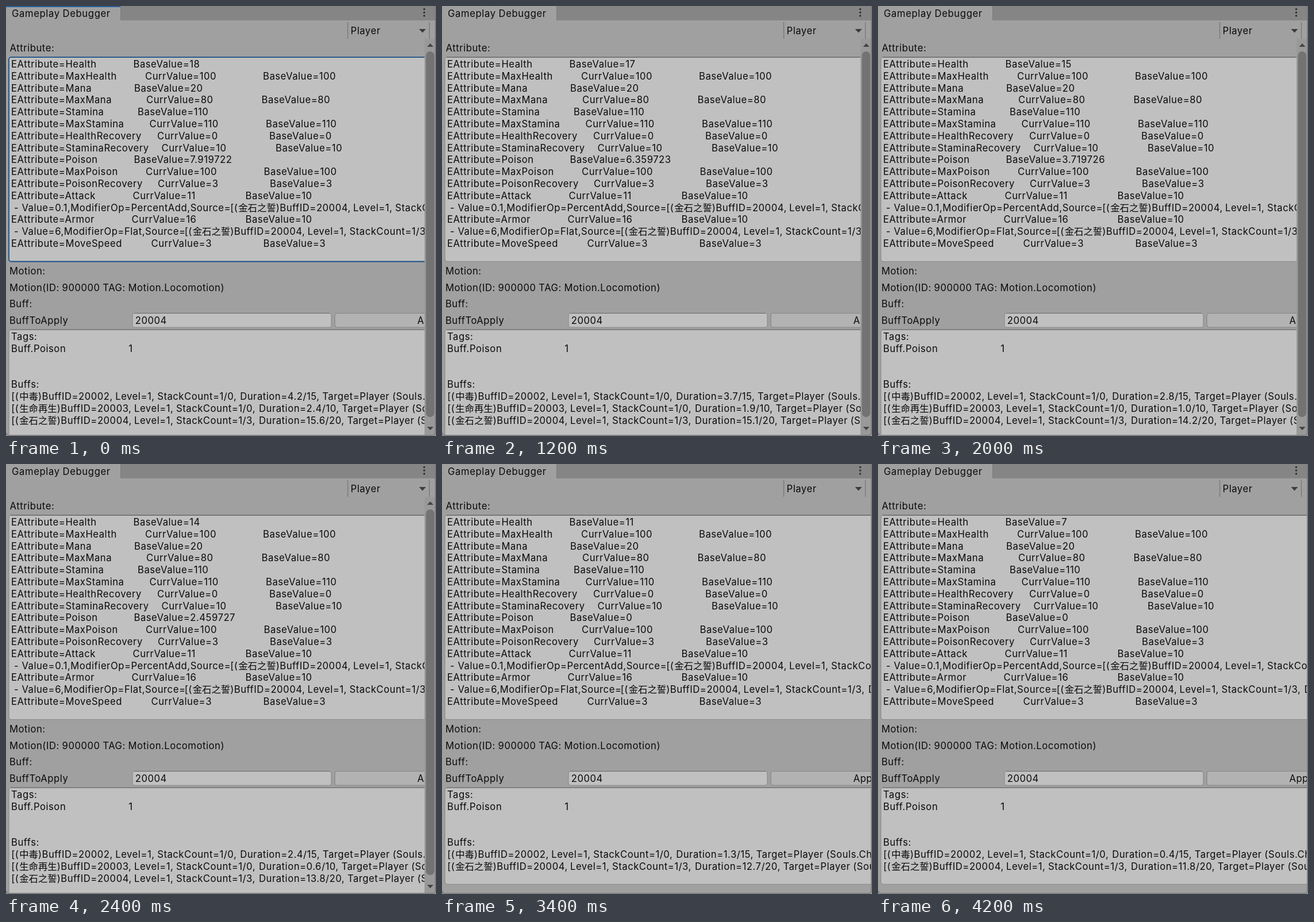
Animation, 748 px wide and 748 px high, one loop 4300 ms. Source, as an HTML page:

```html
<!DOCTYPE html>
<html lang="en">
<head>
<meta charset="utf-8">
<title>Gameplay Debugger</title>
<style>
  html, body { margin: 0; width: 100%; height: 100%; overflow: hidden; background: #a0a0a0; }
  svg { display: block; width: 748px; height: 748px; }
  text {
    font: 16.64px Inter, "Noto Sans CJK SC", "Noto Sans CJK", sans-serif;
    letter-spacing: .54px; word-spacing: -.5px; white-space: pre; fill: #0a0a0a;
  }
  .cjk { font: 500 16.4px "Noto Sans CJK SC", "Noto Sans CJK", sans-serif; letter-spacing: 0; }
  .title { letter-spacing: .64px; }
  .area { fill: #c0c0c0; stroke: #8b8b8b; stroke-width: 1.2; }
  .area.focus { stroke: #1d5087; stroke-width: 1.8; }
  .top { stroke: #666; stroke-width: 1.2; }
</style>
</head>
<body>
<svg viewBox="0 0 748 748">
  <defs><clipPath id="view"><rect id="viewBox" y="57" width="728" height="689"/></clipPath></defs>
  <rect width="748" height="748" fill="#a0a0a0"/>
  <rect x="199" width="549" height="25" fill="#858585"/>
  <path d="M199.5 0V25" stroke="#7c7c7c"/>
  <rect id="tabLine" width="199" height="2" fill="#2b6199"/>
  <g fill="#303030"><circle cx="727.5" cy="5.5" r="1.7"/><circle cx="727.5" cy="11.2" r="1.7"/><circle cx="727.5" cy="17" r="1.7"/></g>
  <path d="M594.5 28V57M736.5 28V57" stroke="#7a7a7a" stroke-width="1.4"/>
  <path d="M718.5 40H730.5L724.5 46.5Z" fill="#3c3c3c"/>
  <g id="header"></g>
  <g clip-path="url(#view)">
    <rect id="attrBox" class="area" x="5" y="89.2" width="760" height="355.3" rx="4"/>
    <path id="attrTop" class="top" d="M8 89.2H748"/>
    <rect class="area" x="220" y="534.5" width="346" height="24.5" rx="4"/>
    <path class="top" d="M223 534.5H563"/>
    <rect x="572" y="534.5" width="330" height="24.5" rx="4" fill="#b2b2b2" stroke="#868686" stroke-width="1.2"/>
    <rect id="buffBox" class="area" x="5" y="563" width="760" height="189" rx="4"/>
    <path class="top" d="M8 563H748"/>
    <g id="labels"></g>
    <g id="live"></g>
  </g>
  <g id="scroll">
    <rect x="728" y="57" width="19" height="689" fill="#999"/>
    <rect x="730.5" y="79" width="14.5" height="636" rx="7.2" fill="#737373"/>
    <path d="M732.5 71H743.5L738 65ZM732.5 732H743.5L738 738Z" fill="#454545"/>
  </g>
  <path d="M747 0V742Q747 747 742 747H5Q.5 747 .5 742" fill="none" stroke="#777" stroke-width="1.6"/>
</svg>
<script>
const $ = id => document.getElementById(id);
const ROW = 20.8, ATTR_Y = 107, BUFF_Y = 685;
const LOOP = 4300, HOLD = 800, STEP = 100;

const text = (x, y, s, cls = "") => `<text x="${x}" y="${y}" class="${cls}">${s}</text>`;
const cols = (y, ...parts) => parts.map(([x, s]) => text(x, y, s)).join("");

// "[(name)BuffID=..., Level=1, StackCount=..., rest"
function buff(x, y, name, id, stack, rest) {
  const end = x + 14.7 + 16.4 * name.length;
  const base = end - 80.3;
  return text(x + .2, y, "[(") + text(x + 14.2, y, name, "cjk") +
    text(end - .6, y, `)BuffID=${id},`) +
    cols(y, [base + 214, "Level=1,"], [base + 287, `StackCount=${stack},`], [base + 431, rest]);
}

const attrs = [
  ["Health"],
  ["MaxHealth", 242, 100, 447, 100],
  ["Mana", 0, 0, 223, 20],
  ["MaxMana", 244, 80, 444.5, 80],
  ["Stamina", 0, 0, 229, 110],
  ["MaxStamina", 249.5, 110, 452, 110],
  ["HealthRecovery", 263, 0, 458, 0],
  ["StaminaRecovery", 270.5, 10, 469, 10],
  ["Poison"],
  ["MaxPoison", 243, 100, 448.5, 100],
  ["PoisonRecovery", 264, 3, 459, 3],
  ["Attack", 220.5, 11, 416.5, 10],
  null,
  ["Armor", 218.5, 16, 416.5, 10],
  null,
  ["MoveSpeed", 252.5, 3, 447.5, 3]
];

$("header").innerHTML = text(10, 19, "Gameplay Debugger", "title") + text(599.5, 49, "Player") + text(6.6, 78.6, "Attribute:");

const oath = "金石之誓";
const modifier = (row, s, x) => {
  const y = ATTR_Y + row * ROW;
  return text(14, y, "-") + text(27.4, y, s) +
    buff(x, y, oath, 20004, "1/3", "Duration=15.6/20");
};

$("labels").innerHTML = attrs.map((a, i) => {
  if (!a) return "";
  const [name, cx, curr, bx, base] = a, y = ATTR_Y + i * ROW;
  return cols(y, [9, "EAttribute=" + name]) +
    (cx ? cols(y, [cx, "CurrValue=" + curr]) : "") +
    (bx ? cols(y, [bx, "BaseValue=" + base]) : "");
}).join("") +
  modifier(12, "Value=0.1,ModifierOp=PercentAdd,Source=", 390) +
  modifier(14, "Value=6,ModifierOp=Flat,Source=", 310.5) +
  cols(467, [5.9, "Motion:"]) +
  cols(495.6, [5.9, "Motion(ID: 900000 TAG: Motion.Locomotion)"]) +
  cols(524, [5.9, "Buff:"]) +
  cols(552.5, [5.9, "BuffToApply"], [224.8, "20004"], [715.4, "Apply"]) +
  cols(581, [9, "Tags:"]) +
  cols(601.8, [9, "Buff.Poison"], [213.2, "1"]) +
  cols(664.2, [9, "Buffs:"]);

// [step, physics ticks, health]
const keys = [[0, 0, 18], [1, 4, 18], [9, 48, 16], [17, 91, 14], [23, 125, 13], [31, 169, 9], [35, 191, 7]];

function sample(k, col) {
  const i = Math.max(1, keys.findIndex(r => r[0] >= k));
  const a = keys[i - 1], b = keys[i];
  return Math.round(a[col] + (b[col] - a[col]) * (k - a[0]) / (b[0] - a[0]));
}

function draw(k) {
  const ticks = sample(k, 1), time = ticks * .02;
  const poison = 7.919722 - ticks * (.06 - 5e-8);
  const buffs = [
    ["中毒", 20002, "1/0", 4.21, 15],
    ["生命再生", 20003, "1/0", 2.4, 10],
    [oath, 20004, "1/3", 15.6, 20]
  ].filter(b => b[3] > time);
  const scrolls = buffs.length > 2, focused = k === 0;

  $("live").innerHTML =
    cols(ATTR_Y, [221.5, "BaseValue=" + sample(k, 2)]) +
    cols(ATTR_Y + 8 * ROW, [222.5, "BaseValue=" + (poison > .001 ? +poison.toPrecision(7) : 0)]) +
    buffs.map(([name, id, stack, left, total], i) =>
      buff(9, BUFF_Y + i * ROW, name, id, stack,
        `Duration=${(left - time).toFixed(1)}/${total}, Target=Player (Souls.Character)`)).join("");

  $("viewBox").setAttribute("width", scrolls ? 728 : 746.5);
  $("buffBox").setAttribute("height", 126.4 + ROW * buffs.length);
  $("scroll").style.display = scrolls ? "" : "none";
  $("tabLine").style.display = focused ? "" : "none";
  $("attrTop").style.display = focused ? "none" : "";
  $("attrBox").classList.toggle("focus", focused);
}

let shown = -1;
const start = performance.now();
function tick() {
  const t = (performance.now() - start) % LOOP;
  const k = t < HOLD ? 0 : Math.min(35, Math.floor((t - HOLD) / STEP) + 1);
  if (k !== shown) draw(shown = k);
  requestAnimationFrame(tick);
}
tick();
</script>
</body>
</html>
```
